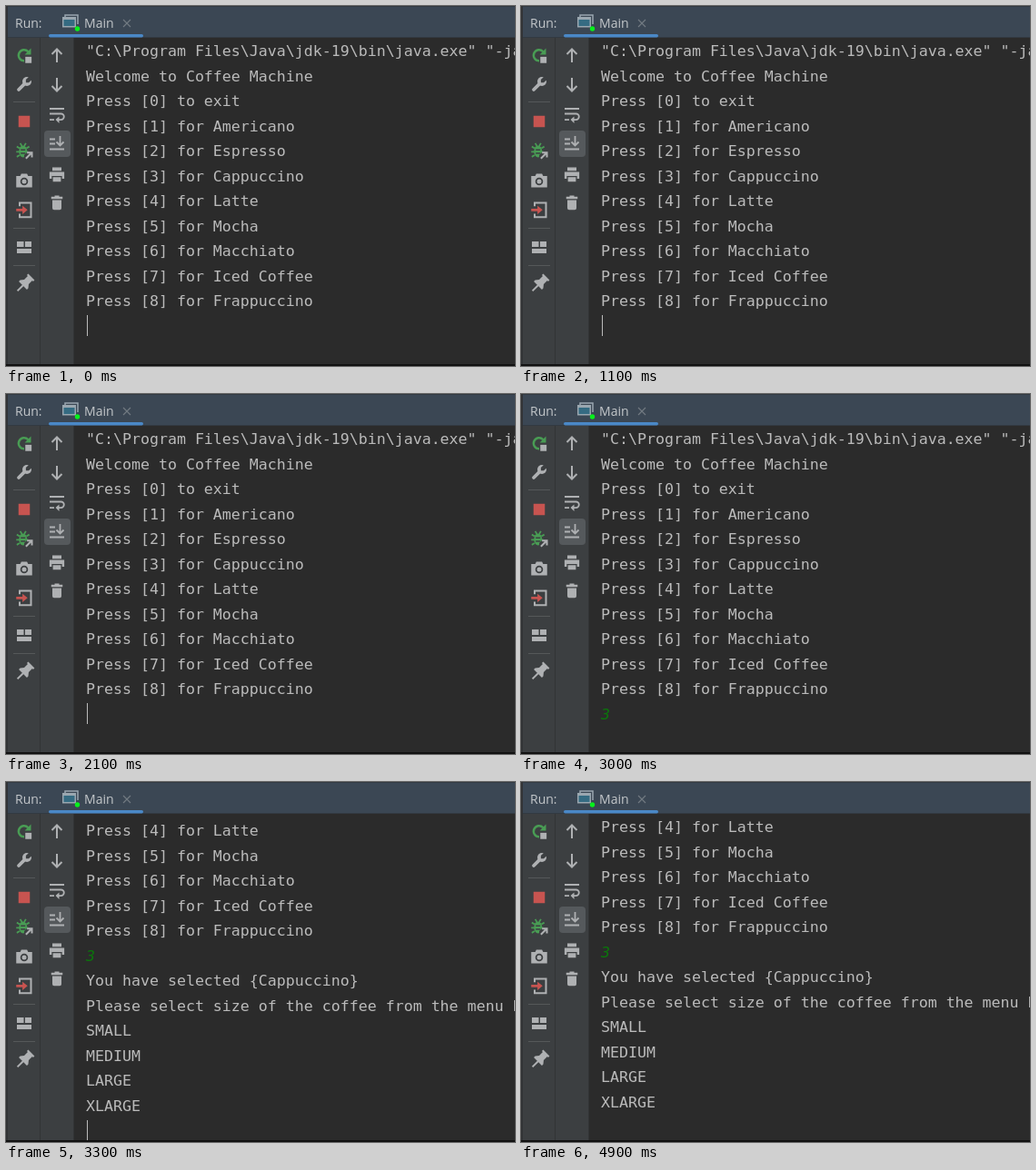
An HTML page that plays this animation: 560 px wide and 396 px high, repeating every 5 s.

```html
<!DOCTYPE html>
<html lang="en">
<head>
<meta charset="utf-8">
<title>Run console</title>
<style>
  html, body { margin: 0; width: 100%; height: 100%; overflow: hidden; background: #2b2b2b; }
  svg { display: block; }
  .ui { font: 14px "Open Sans", "Noto Sans", sans-serif; fill: #c3c7ca; }
  #lines { font: 16.6px "DejaVu Sans Mono", monospace; fill: #bbbbbb; }
  #lines text { white-space: pre; }
  #lines .typed { font-style: italic; fill: #0b760b; }
  .icon { fill: #afb1b3; stroke: none; }
  .line { fill: none; stroke: #afb1b3; stroke-width: 1.6; }
  .green { fill: #499c54; }
  .red { fill: #c75450; }
  .hole { fill: #3c3f41; }
</style>
</head>
<body>
<svg width="560" height="396" viewBox="0 0 560 396">
  <rect width="560" height="396" fill="#2b2b2b"/>
  <g id="console">
    <g id="lines"></g>
    <rect id="caret" x="89" width="1" height="23" fill="#bbbbbb"/>
  </g>

  <!-- window chrome -->
  <rect y="35" width="75" height="360" fill="#3c3f41"/>
  <path d="M37.5 35V395M74.5 35V395" stroke="#323435"/>
  <rect width="560" height="35" fill="#3b4754"/>
  <path d="M0 .5H560M0 34.5H560" stroke="#323a42"/>
  <rect width="2" height="396" fill="#313335"/>
  <rect y="394" width="560" height="2" fill="#111"/>
  <rect x="47" y="31" width="104" height="3.5" rx="1.700" fill="#4a88c7"/>
  <text class="ui" x="10" y="24">Run:</text>
  <text class="ui" x="86" y="24">Main</text>
  <path d="M129 15l8 8m0-8l-8 8" stroke="#727b83" stroke-width="1.100"/>
  <path d="M65 13V10H79V20" fill="none" stroke="#9aa7b0" stroke-width="1.500"/>
  <rect x="62" y="12" width="15" height="11.500" fill="#9aa7b0"/>
  <rect x="63.500" y="15" width="12" height="7" fill="#356b82"/>
  <circle cx="78.500" cy="25" r="2.700" fill="#08f01c"/>
  <path d="M8 105.500H32M8 244.500H32M8 285.500H32" stroke="#555859"/>
  <rect x="42" y="137" width="29" height="29" rx="4" fill="#55595c"/>

  <!-- left toolbar, 16-unit icons -->
  <g class="icon" transform="translate(10 44) scale(1.25)">
    <path class="line" d="M8 13A4.800 4.800 0 1 1 11.500 5" style="stroke:#499c54;stroke-width:2"/>
    <path class="green" d="M14 2V7.500H8.500Z"/>
    <rect x="9" y="9.500" width="5.500" height="5.500"/>
  </g>
  <g class="icon" transform="translate(10 76) scale(1.25)">
    <path class="line" d="M3.200 12.800L9.500 6.500" style="stroke-width:3;stroke-linecap:round"/>
    <circle cx="10.400" cy="5.600" r="4"/>
    <path class="hole" d="M9.500 6.500V4L13 .5L16 3L12 6.500Z"/>
  </g>
  <rect class="red" x="13.750" y="120.750" width="12.500" height="12.500"/>
  <g class="icon" transform="translate(10 149) scale(1.25)">
    <path class="line" d="M1.500 4.500L4 6M1 9H13M1.500 13.500L4 12M12.500 4.500L10 6M4.500 1.500L6 4M9.500 1.500L8 4" style="stroke:#499c54;stroke-width:1.400"/>
    <ellipse class="green" cx="7" cy="8.700" rx="3.600" ry="5.200"/>
    <path class="hole" d="M5 6.800H9V8H5ZM5 9.800H9V11H5ZM8 16V12L12 8H16V16Z"/>
    <path class="line" d="M9.500 15L14.500 10M10.500 9.800H14.800V14"/>
  </g>
  <g class="icon" transform="translate(10 182) scale(1.25)">
    <path d="M1 4H4.500L5.500 2H10.500L11.500 4H15V14H1Z"/>
    <circle class="hole" cx="8" cy="8.800" r="3.400"/>
    <circle cx="8" cy="8.800" r="2"/>
  </g>
  <g class="icon" transform="translate(10 214) scale(1.25)">
    <path class="line" d="M4 5V2H14V14.500H4V11.500"/>
    <path class="red" d="M1 7.200H6.500V4.500L11 8.200L6.500 12V9.300H1Z"/>
  </g>
  <path class="icon" d="M12 259h7.500v6H12zM21 259h7v6h-7zM12 267h16v5H12z"/>
  <g class="icon" transform="translate(21 305) rotate(45) scale(1.400)">
    <path d="M-3.500-7H3.500V-5.500H2.500V-1.500L4.500 1V2.500H-4.500V1L-2.500-1.500V-5.500H-3.500ZM-.7 2.500H.7V8.500H-.7Z"/>
  </g>

  <!-- console toolbar -->
  <path class="line" d="M56 62V47.500M50.500 53l5.500-5.500l5.500 5.500" style="stroke-width:2"/>
  <path class="line" d="M56 79V93.500M50.500 88l5.500 5.500l5.500-5.500" style="stroke-width:2"/>
  <path class="line" d="M48 113H64M48 118.500H60.500a3.300 3.300 0 0 1 0 6.600H57M48 125.100H53" style="stroke-width:1.800"/>
  <path class="icon" d="M58.500 121.500V129L54.500 125.100Z"/>
  <path class="line" d="M48 146.500H54M48 151.500H54M48 157.500H64M59.500 143V153M55.500 149.500l4 4l4-4" style="stroke-width:1.800"/>
  <g class="icon" transform="translate(46 175) scale(1.25)">
    <path d="M4 2H12V5H4ZM1.500 6H14.500V12H12.500V9.500H3.500V12H1.500ZM4.500 10.500H11.500V14.500H4.500Z"/>
  </g>
  <g class="icon" transform="translate(46 206) scale(1.25)">
    <path d="M6 2H10V3H13V5H3V3H6ZM4 6H12V13A1.500 1.500 0 0 1 10.500 14.500H5.500A1.500 1.500 0 0 1 4 13Z"/>
  </g>
</svg>
<script>
const LOOP = 5000, ROW = 27.5, FIRST = 49.5;
const drinks = ['Americano', 'Espresso', 'Cappuccino', 'Latte', 'Mocha', 'Macchiato', 'Iced Coffee', 'Frappuccino'];
const output = [
  '"C:\\Program Files\\Java\\jdk-19\\bin\\java.exe" "-javaagent',
  'Welcome to Coffee Machine',
  'Press [0] to exit',
  ...drinks.map((name, i) => `Press [${i + 1}] for ${name}`),
  '3',
  'You have selected {Cappuccino}',
  'Please select size of the coffee from the menu below',
  'SMALL', 'MEDIUM', 'LARGE', 'XLARGE'
];
const INPUT = 11, END = output.length;
const TYPED = 2400, REPLY = 3200, MENU = 3300, SETTLED = 3400;
const caretOn = [[0, 100], [600, 1200], [1700, 2200], [TYPED, 3000], [MENU, 3900], [4300, 4900]];

const byId = id => document.getElementById(id);
const consoleView = byId('console'), caret = byId('caret');
const rowCenter = i => FIRST + ROW * i;
const rows = output.map((content, i) => {
  const row = document.createElementNS('http://www.w3.org/2000/svg', 'text');
  row.textContent = content;
  row.setAttribute('x', 88);
  row.setAttribute('y', Math.floor(rowCenter(i) + 6));
  if (i === INPUT) row.setAttribute('class', 'typed');
  byId('lines').append(row);
  return row;
});

function draw(now) {
  const t = now % LOOP;
  const shown = t < TYPED ? INPUT : t < REPLY ? INPUT + 1 : t < MENU ? INPUT + 2 : END;
  const scroll = t < MENU ? 0 : t < SETTLED ? 161 : 165;
  const caretRow = t < MENU ? INPUT : END;
  rows.forEach((row, i) => row.setAttribute('visibility', i < shown ? 'visible' : 'hidden'));
  consoleView.setAttribute('transform', `translate(0 ${-scroll})`);
  caret.setAttribute('x', t >= TYPED && t < MENU ? 98 : 89);
  caret.setAttribute('y', Math.round(rowCenter(caretRow) - 12));
  caret.setAttribute('visibility', caretOn.some(([from, to]) => t >= from && t < to) ? 'visible' : 'hidden');
}

let start;
function tick(now) {
  start ??= now;
  draw(now - start);
  requestAnimationFrame(tick);
}
draw(0);
requestAnimationFrame(tick);
</script>
</body>
</html>
```
